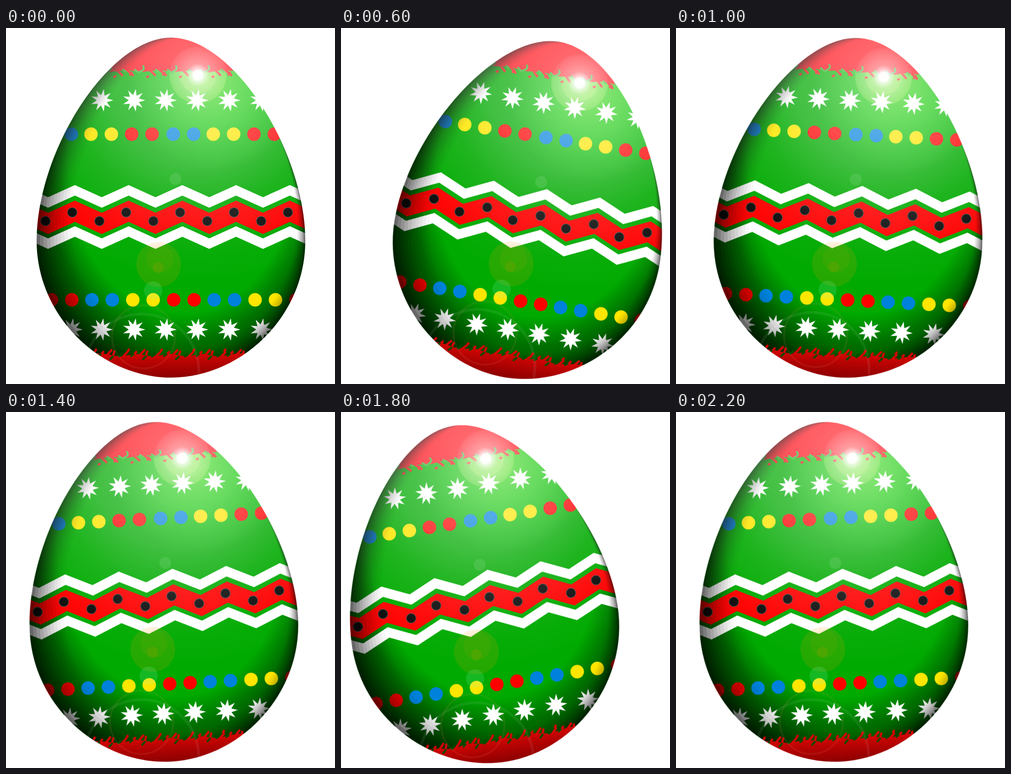
These frames come from a looping animation (720 px wide and 778 px high, 2.4 s). An HTML page without scripts:

```html
<!DOCTYPE html>
<html lang="en">
<head>
<meta charset="utf-8">
<title>Rocking egg</title>
<style>
html, body { margin: 0; width: 100%; height: 100%; overflow: hidden; background: #fff; }
svg { display: block; width: 720px; height: 778px; }
#rock { transform-origin: 362px 760px; animation: rock 2.4s step-end infinite; }
@keyframes rock {
  0%, 50%, 100% { transform: rotate(0deg); }
  8.33%, 41.66% { transform: rotate(3deg); }
  16.66%, 33.33% { transform: rotate(6deg); }
  25% { transform: rotate(9deg); }
  58.33%, 91.66% { transform: rotate(-3deg); }
  66.66%, 83.33% { transform: rotate(-6deg); }
  75% { transform: rotate(-9deg); }
}
.beads { fill: none; stroke-width: 29.5; stroke-linecap: round; stroke-dasharray: 0 44.6 0 223; }
.r { stroke: #f00; }
.y { stroke: #ffe600; }
.b { stroke: #0082dc; }
.seeds { fill: none; stroke: #0d0d0d; stroke-width: 20; stroke-linecap: round; stroke-dasharray: 0 118; }
.rim { stroke: #555; stroke-width: 22; }
.stars { fill: none; marker: url(#star); }
.drip { fill: none; stroke-linecap: round; stroke-width: 5; }
</style>
</head>
<body>
<svg viewBox="0 0 720 778">
<defs>
  <path id="egg" d="M361 21C498 21 655 270 655 465C655 632 513 764 361 764C209 764 67 632 67 465C67 270 224 21 361 21Z"/>
  <clipPath id="shell"><use href="#egg"/></clipPath>

  <!-- nested shells: dark at the rim, clear inside -->
  <mask id="rimShade" maskUnits="userSpaceOnUse" x="0" y="0" width="720" height="778">
    <use href="#egg" fill="#999"/>
    <use href="#egg" fill="#838383" transform="matrix(.984 0 0 .992 8.6 .2)"/>
    <use href="#egg" fill="#6e6e6e" transform="matrix(.968 0 0 .984 17.1 .3)"/>
    <use href="#egg" fill="#5b5b5b" transform="matrix(.953 0 0 .976 25.7 .5)"/>
    <use href="#egg" fill="#494949" transform="matrix(.937 0 0 .968 34.2 .7)"/>
    <use href="#egg" fill="#393939" transform="matrix(.921 0 0 .96 42.8 .9)"/>
    <use href="#egg" fill="#2b2b2b" transform="matrix(.905 0 0 .952 51.4 1)"/>
    <use href="#egg" fill="#1e1e1e" transform="matrix(.889 0 0 .943 59.9 1.2)"/>
    <use href="#egg" fill="#121212" transform="matrix(.874 0 0 .935 68.5 1.4)"/>
    <use href="#egg" fill="#080808" transform="matrix(.858 0 0 .927 77 1.5)"/>
    <use href="#egg" transform="matrix(.842 0 0 .919 85.6 1.7)"/>
  </mask>

  <!-- body of the shell, under the decoration -->
  <radialGradient id="body" gradientUnits="userSpaceOnUse" cx="0" cy="0" r="1.2" gradientTransform="matrix(300 0 0 390 385 300)">
    <stop offset=".69" stop-opacity="0"/>
    <stop offset=".833" stop-opacity=".35"/>
    <stop offset="1" stop-opacity=".55"/>
  </radialGradient>
  <radialGradient id="glow" gradientUnits="userSpaceOnUse" cx="455" cy="125" r="190">
    <stop offset="0" stop-color="#70ff30" stop-opacity=".55"/>
    <stop offset=".45" stop-color="#50ff30" stop-opacity=".36"/>
    <stop offset="1" stop-color="#40ff30" stop-opacity="0"/>
  </radialGradient>
  <radialGradient id="shine" gradientUnits="userSpaceOnUse" cx="420" cy="103" r="460">
    <stop offset="0" stop-color="#fff"/>
    <stop offset=".02" stop-color="#fff" stop-opacity=".95"/>
    <stop offset=".055" stop-color="#fff" stop-opacity=".58"/>
    <stop offset=".14" stop-color="#fff" stop-opacity=".38"/>
    <stop offset=".43" stop-color="#fff" stop-opacity=".26"/>
    <stop offset=".63" stop-color="#fff" stop-opacity=".12"/>
    <stop offset=".85" stop-color="#fff" stop-opacity=".03"/>
    <stop offset="1" stop-color="#fff" stop-opacity="0"/>
  </radialGradient>
  <linearGradient id="base" gradientUnits="userSpaceOnUse" x1="0" y1="700" x2="0" y2="764">
    <stop offset="0" stop-color="#de0606"/>
    <stop offset="1" stop-color="#8c0000"/>
  </linearGradient>

  <marker id="star" markerUnits="userSpaceOnUse" markerWidth="52" markerHeight="52" viewBox="-26 -26 52 52" orient="0">
    <path fill="#fff" d="M25 0L10.8 3.9 19 16 5.8 10 4 24.5-2 11.3-12.5 21.5-8.8 7.4-23.5 8.5-11.5 0-23.5-8.5-8.8-7.4-12.5-21.5-2-11.3 4-24.5 5.8-10 19-16 10.8-3.9Z"/>
  </marker>
  <path id="zig" fill="none" stroke-miterlimit="9" d="M33.2 0l58.8 26.5 58.8-26.5 58.8 26.5 58.8-26.5 58.8 26.5 58.8-26.5 58.8 26.5 58.8-26.5 58.8 26.5 58.8-26.5 58.8 26.5"/>

  <g id="icing" class="drip">
    <path stroke="#ff0a14" d="M15 92l11 11M37 92l13 11M-25 98l-3 4M9 107l2-1"/>
    <path stroke="#2fb62f" stroke-width="4" d="M0 83q4 6-2 10l-8 4M-18 91l5 4M28 91l5 4"/>
  </g>
  <g id="flames" class="drip">
    <path stroke="#d20505" d="M-25 719l10-11M-9 717l12-13M7 714l2-7M28 718l9-9M-33 706l2-3"/>
    <path stroke="#004c00" stroke-width="4" d="M0 724l6-6M-26 717l5-4M20 718l5-6"/>
  </g>
</defs>

<g id="rock">
  <g clip-path="url(#shell)">
    <rect width="720" height="778" fill="#00aa00"/>
    <rect width="720" height="778" fill="url(#body)"/>
    <rect width="720" height="778" fill="url(#glow)"/>
    <g fill="#ffff60" opacity=".5">
      <circle cx="420" cy="103" r="62" opacity=".3"/>
      <circle cx="420" cy="103" r="40" opacity=".4"/>
    </g>

    <path fill="#ff0a14" d="M180 0H540V96L495 94 470 92 445 97 410 92 372 96 335 92 300 96 262 92 220 97H180Z"/>
    <use href="#icing" x="228"/>
    <use href="#icing" x="300"/>
    <use href="#icing" x="372"/>
    <use href="#icing" x="443"/>
    <use href="#icing" x="515"/>

    <path class="stars" d="M210 158h70h69h69h70h70"/>
    <path class="stars" d="M143 659h66h71h69h69h70h71"/>

    <path class="beads b" d="M98.4 232H620"/>
    <path class="beads y" d="M186 232H620"/>
    <path class="beads r" d="M275 232H620"/>
    <path class="beads r" d="M99.4 594H660"/>
    <path class="beads b" d="M188 594H660"/>
    <path class="beads y" d="M277.5 594H660"/>

    <use href="#zig" y="354.8" stroke="#fff" stroke-width="21"/>
    <use href="#zig" y="400.5" stroke="#f00" stroke-width="42.5"/>
    <use href="#zig" y="444.8" stroke="#fff" stroke-width="21"/>
    <path class="seeds rim" d="M86.5 422H640M145 403H640"/>
    <path class="seeds" d="M86.5 422H640M145 403H640"/>

    <rect width="720" height="778" mask="url(#rimShade)"/>

    <path fill="url(#base)" d="M150 708L215 712 250 718 285 712 320 718 360 712 395 718 430 712 465 718 500 712 570 708V778H150Z"/>
    <use href="#flames" x="228"/>
    <use href="#flames" x="300"/>
    <use href="#flames" x="372"/>
    <use href="#flames" x="443"/>
    <use href="#flames" x="511"/>

    <rect width="720" height="778" fill="url(#shine)"/>

    <!-- lens glints -->
    <circle cx="420" cy="103" r="62" fill="#fff" opacity=".05"/>
    <circle cx="420" cy="103" r="12" fill="#fff" opacity=".7"/>
    <circle cx="371" cy="330" r="13" fill="#fff" opacity=".1"/>
    <g fill="#ff9a00">
      <circle cx="334" cy="517" r="49" opacity=".14"/>
      <circle cx="337" cy="505" r="30" opacity=".06"/>
      <circle cx="333" cy="523" r="12" opacity=".12"/>
    </g>
    <circle cx="322" cy="574" r="20" fill="#80ffd0" opacity=".16"/>
    <g fill="none">
      <circle cx="301" cy="675" r="69" stroke="#ff9060" stroke-width="4" opacity=".1"/>
      <circle cx="297" cy="750" r="125" stroke="#fff" stroke-width="6" opacity=".07"/>
    </g>
  </g>
</g>
</svg>
</body>
</html>
```
